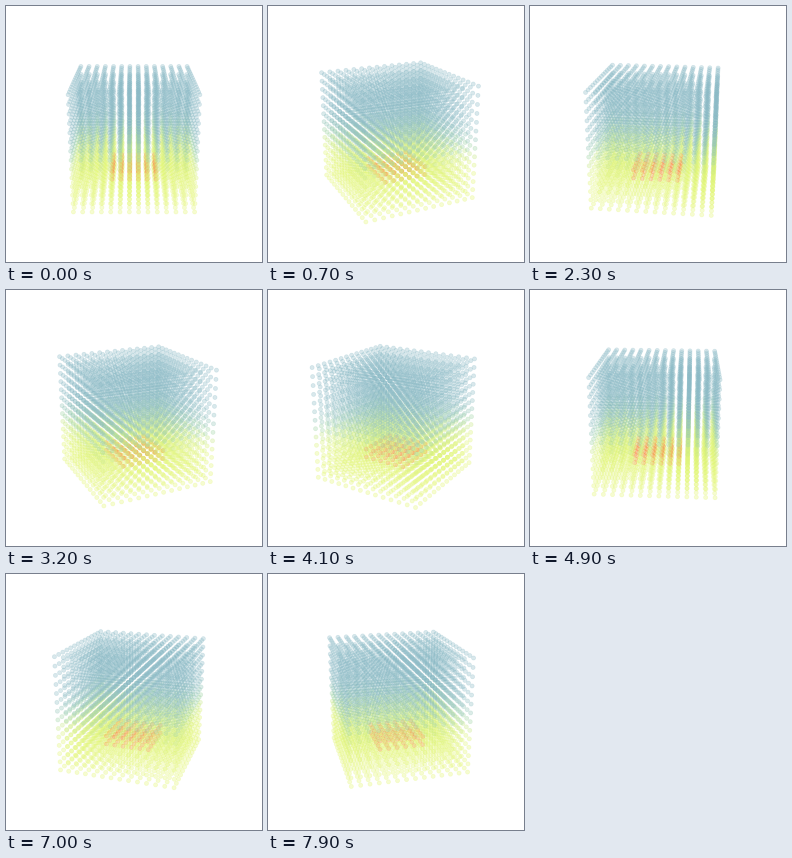
A matplotlib script for the animation above (8000 ms loop, 256 px wide and 256 px high).

```python
import numpy as np
import matplotlib.pyplot as plt
from matplotlib.animation import FuncAnimation
from matplotlib.colors import LinearSegmentedColormap

SIZE, DPI = 256, 100
FRAMES, INTERVAL = 80, 100
STEP = np.radians(3.6)

SIDE = 14                      # points along each edge of the cube
ELEV = np.radians(19.8)
DIST = 9.1                     # camera distance in half edges
SCALE = 56.6                   # pixels per half edge at the centre
CENTER = np.array([128.0, 128.4])
ALPHA = 0.32
HEAT_MAP = LinearSegmentedColormap.from_list(
    "heat", ["#8abac6", "#9cd2aa", "#e4f872", "#fa8a46"])

axis = np.linspace(-1, 1, SIDE)
x, y, z = (g.ravel() for g in np.meshgrid(axis, axis, axis))


def heat():
    """Cool top, warm bottom and a hot plate inside the lower part."""
    value = (1 - np.tanh((z + 0.06) / 0.24)) / 3
    plate = (np.abs(x) < 0.4) & (np.abs(y) < 0.4)
    value[plate & (np.abs(z + 0.615) < 0.1)] = 1
    return value


colors = HEAT_MAP(heat())
colors[:, 3] = ALPHA


def project(angle):
    """Return pixel positions and nearness after a turn about the z axis."""
    c, s = np.cos(angle), np.sin(angle)
    right, front = x * c + y * s, y * c - x * s
    near = front * np.cos(ELEV) + z * np.sin(ELEV)
    down = front * np.sin(ELEV) - z * np.cos(ELEV)
    zoom = SCALE * DIST / (DIST - near)
    return CENTER + np.column_stack([right * zoom, down * zoom]), near


fig = plt.figure(figsize=(SIZE / DPI, SIZE / DPI), dpi=DPI, facecolor="white")
ax = fig.add_axes([0, 0, 1, 1])
ax.set(xlim=(0, SIZE), ylim=(SIZE, 0))
ax.axis("off")
dots = ax.scatter(x, y, s=8.6, c=colors, linewidths=0.45)


def update(i):
    pos, near = project(i * STEP)
    order = np.argsort(near)
    dots.set_offsets(pos[order])
    dots.set_facecolor(colors[order])
    dots.set_edgecolor(colors[order])
    return [dots]


anim = FuncAnimation(fig, update, frames=FRAMES, interval=INTERVAL,
                     repeat=True, repeat_delay=0)
plt.show()
```
